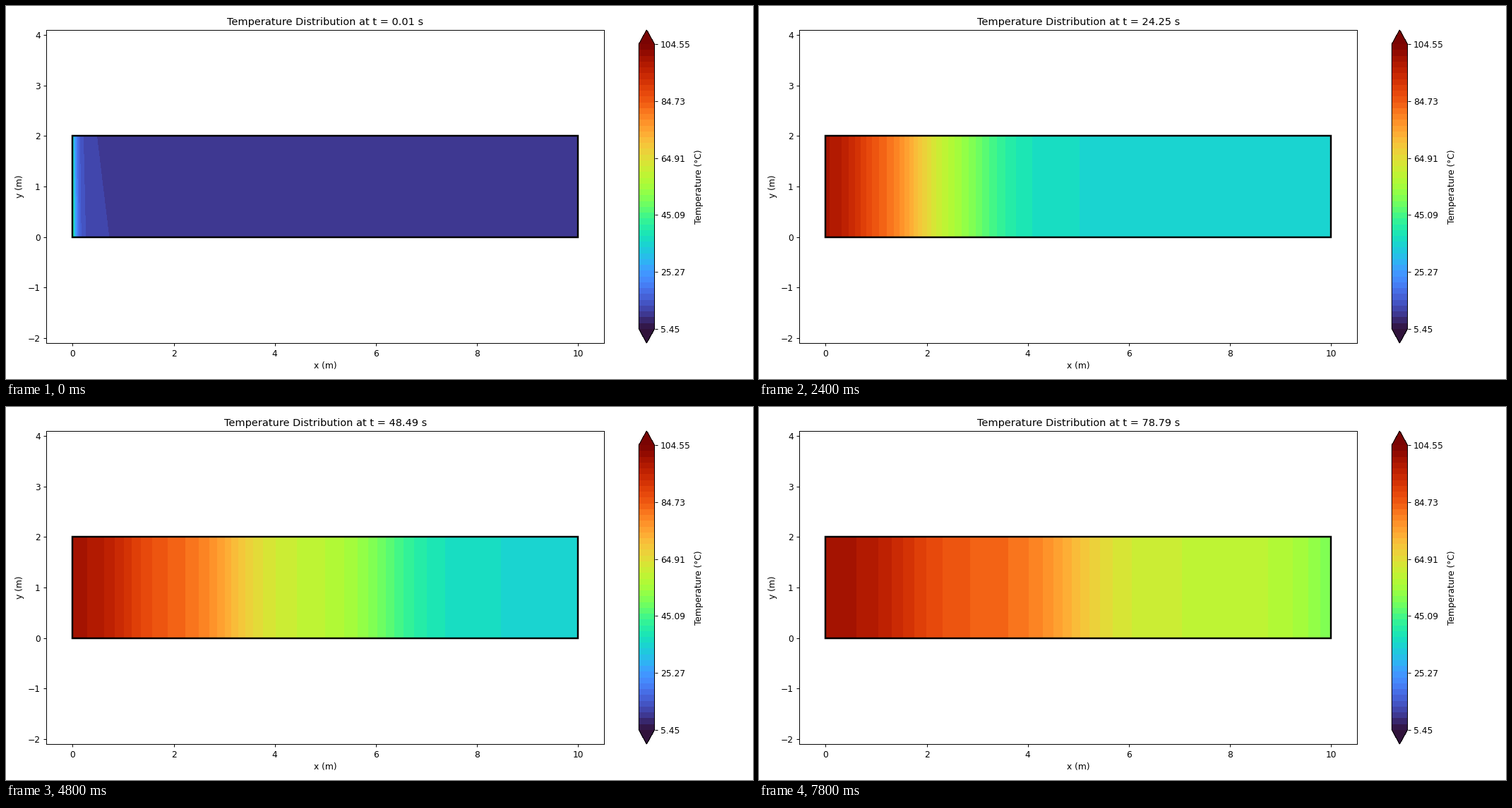
A matplotlib script for the animation above (8000 ms loop, 1058 px wide and 529 px high).

```python
import numpy as np
import matplotlib.pyplot as plt
from matplotlib.animation import FuncAnimation
from matplotlib.patches import Rectangle

W, H = 1058, 529
FRAMES, INTERVAL = 40, 200
T0, DT = 0.01, 2.02

SCALE = 71.6                          # pixels per metre
T_LOW, T_HIGH = 60 / 11, 1150 / 11    # colour range
T_COLD, T_WARM = 10.0, 35.5           # initial state and first plateau

# Heat fronts: temperature rise, speed, offset, early lead, width, spreading.
FRONTS = [
    (24.3, 0.1320, -0.18, 0.42, 0.26, 0.036),
    (24.2, 0.0570, 0.40, 0.11, 0.00, 0.058),
    (16.0, 0.0176, 0.20, 0.00, 0.00, 0.0484),
]

plt.rcParams["font.family"] = "DejaVu Sans"

levels = np.linspace(T_LOW, T_HIGH, 50)
x, y = np.meshgrid(np.linspace(0, 10, 1433), np.linspace(0, 2, 21))


def start_layer():
    """Thin heated layer at the wall, a little wider at the bottom."""
    hot = (32 - 4 * y) * np.exp(-x / 0.06)
    tail = 4.6 * np.exp(-x / (0.65 - 0.11 * y))
    return T_COLD + hot + tail


def temperature(t):
    """Quick warm-up along the bar, followed by three spreading fronts."""
    if t <= T0:
        return start_layer()
    tau = 0.01 + 5.5 * np.tanh(x / 8)
    temp = T_WARM - (T_WARM - T_COLD) * np.exp(-t / tau)
    settle = 1 - np.exp(-t / 2)
    for rise, speed, offset, lead, width, spread in FRONTS:
        centre = speed * t + offset * settle + lead * t * np.exp(-t / 5)
        w = width * settle + spread * np.sqrt(t)
        temp += rise * 0.5 * (1 - np.tanh((x - centre) / (2 * w)))
    return temp


def box(x0, y0, x1, y1):
    """Axes rectangle from pixel edges measured from the top left."""
    return [x0 / W, 1 - y1 / H, (x1 - x0) / W, (y1 - y0) / H]


def fill(t):
    return ax.contourf(x, y, temperature(t), levels=levels, cmap="turbo",
                       extend="both")


fig = plt.figure(figsize=(12, 6), dpi=W / 12, facecolor="white")
ax = fig.add_axes(box(57.3, 34, 847.3, 478))
cax = fig.add_axes(box(896.3, 34, 918.5, 478))

state = {"fill": fill(T0)}
bar = fig.colorbar(state["fill"], cax=cax, format="%.2f",
                   ticks=np.linspace(T_LOW, T_HIGH, 6))
bar.set_label("Temperature (°C)")

ax.add_patch(Rectangle((0, 0), 10, 2, fill=False, ec="black", lw=2, zorder=3))
ax.set_xlim(5 - 395 / SCALE, 5 + 395 / SCALE)
ax.set_ylim(1 - 222 / SCALE, 1 + 222 / SCALE)
ax.set_xticks(range(0, 11, 2))
ax.set_yticks(range(-2, 5))
ax.set_xlabel("x (m)")
ax.set_ylabel("y (m)")
title = ax.set_title("", fontsize=11.85)


def update(k):
    t = T0 + DT * k
    state["fill"].remove()
    state["fill"] = fill(t)
    title.set_text(f"Temperature Distribution at t = {t:.2f} s")
    return []


anim = FuncAnimation(fig, update, frames=FRAMES, interval=INTERVAL,
                     init_func=lambda: update(0), repeat=True, repeat_delay=0)
plt.show()
```
